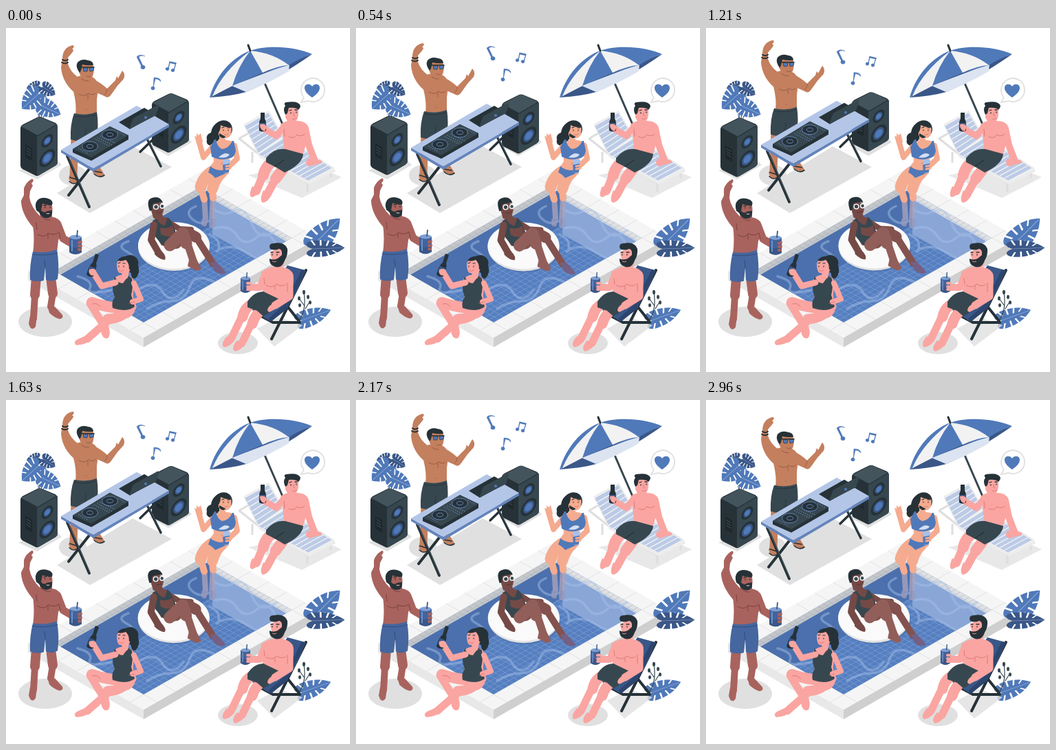
An HTML page that plays this animation: 500x500 px, repeating every 3000 ms.

```html
<!DOCTYPE html>
<html lang="en">
<head>
<meta charset="utf-8">
<title>Pool party</title>
<style>
html,body{margin:0;width:100%;height:100%;overflow:hidden;background:#fff}
svg{display:block;width:100%;height:100%}
.s{fill:var(--s)}
.l{fill:none;stroke:var(--s);stroke-linecap:round;stroke-linejoin:round}
.ln{fill:none;stroke:var(--d);stroke-width:.8;stroke-linecap:round}
.k{fill:#263238}
.g{fill:#37474f}
.b{fill:#5079b9}
.n{fill:#3a5788}
.sh{fill:#e0e0e0}
.ink{fill:none;stroke:#263238;stroke-linecap:round;stroke-linejoin:round}
.w{fill:none;stroke:#fff;stroke-linecap:round}
</style>
</head>
<body>
<svg viewBox="0 0 500 500">
<defs>
  <g id="leaf">
    <path d="M0 0C-.3-.5-1-.4-1 .2C-1 .9-.5 1.3 0 1.6C.5 1.3 1 .9 1 .2C1-.4.3-.5 0 0"/>
    <path class="w" stroke-width=".09" d="M-.45.1L-1-.05M-.4.4L-1 .4M-.35.7L-.9.8M-.3 1L-.6 1.2M.45.1L1-.05M.4.4L1 .4M.35.7L.9.8M.3 1L.6 1.2"/>
    <path class="w" stroke-width=".04" opacity=".5" d="M0 0V1.5"/>
  </g>
  <g id="speaker">
    <path class="k" d="M21 146Q21 142 25 140L45 130Q49 128 53 130L72 138Q75 140 75 143V195Q75 198 72 200L48 214Q45 216 42 214L24 205Q21 203 21 200Z"/>
    <path fill="#43545d" d="M22 143L47 130Q49 129 52 130L73 140L46 156Z"/>
    <path class="g" d="M45 158L72 142Q75 140 75 144V195Q75 198 72 200L48 214Q45 215 45 212Z"/>
    <path fill="#1d272c" d="M28 169L38 175V193L28 188Z"/>
    <path class="ink" style="stroke:#43545d" d="M30 174L36 178M30 178L36 182M30 182L36 186"/>
    <g transform="translate(60 164) skewY(-30)"><circle class="k" r="8.5"/><circle class="n" r="5.5"/><circle class="b" r="3.8"/></g>
    <g transform="translate(60 189) skewY(-30)"><circle class="k" r="11.5"/><circle class="n" r="8"/><circle class="b" r="5.5"/></g>
  </g>
  <g id="can">
    <path fill="#44639b" d="M-9-11Q0-16 9-11V11Q0 17-9 11Z"/>
    <path class="n" d="M-9 2Q0 7 9 2V11Q0 17-9 11Z"/>
    <path fill="#6d90c9" d="M-6-7H-4V10L-6 9Z"/>
    <ellipse fill="#7f9fd2" cy="-11" rx="8.5" ry="3.2"/>
    <path fill="none" stroke="#3a5788" stroke-width="1.8" d="M2-11L3-21"/>
  </g>
  <clipPath id="basin"><path d="M70 353L284 230L416 305L200 428Z"/></clipPath>
</defs>

<!-- ground shadows -->
<path class="sh" d="M74 240L184 172L241 202L122 269Z"/>
<path class="sh" d="M18 207L45 220L81 199L72 190ZM208 170L236 186L270 166L262 158Z"/>
<ellipse class="sh" cx="97" cy="214" rx="20" ry="15"/>
<ellipse class="sh" cx="57" cy="427" rx="39" ry="22"/>
<path class="sh" d="M352 214L430 247L488 217L440 196Z" opacity=".75"/>

<!-- potted leaves -->
<path class="ink" style="stroke:#3a5788" d="M42 88Q49 110 49 135M58 90Q52 110 51 135M40 106Q47 118 48 135M64 117Q56 118 53 135"/>
<g class="n"><use href="#leaf" transform="translate(47 84) rotate(78) scale(8 11)"/><use href="#leaf" transform="translate(54 86) rotate(-58) scale(10 13)"/></g>
<g class="b"><use href="#leaf" transform="translate(47 96) rotate(48) scale(16 20)"/><use href="#leaf" transform="translate(52 113) rotate(-65) scale(13 19)"/></g>

<use id="spkL" href="#speaker"/>
<use id="spkR" href="#speaker"/>

<g id="booth">
  <g style="--s:#c37f5e;--d:#8f5640">
    <path class="l" stroke-width="11" d="M100 160L98 215M125 158L130 203"/>
    <path class="s" d="M94 210L103 212L104 223Q100 229 94 225L91 218ZM126 200L135 200L143 213Q141 218 135 216L126 210Z"/>
    <path class="ink" stroke-width="1.6" d="M93 217L102 220M128 208L139 210M92 223Q98 229 104 224M128 212Q136 219 143 214"/>
    <path class="s" d="M82 45C82 34 87 27 97 25Q101 26 96 31Q100 31 96 36L90 43L90 52Q93 63 105 72L103 96C90 88 81 73 80 57Z"/>
    <path class="s" d="M126 74Q137 79 147 88L159 76L161 70L163 73L169 62Q174 67 171 74L162 84L152 98Q148 103 143 99L127 92Z"/>
    <path class="s" d="M97 74Q106 68 114 70Q127 69 131 76Q135 88 132 104L132 125L101 126Q103 112 98 92Z"/>
    <path class="s" d="M108 62L110 73Q117 79 122 72V64Z"/>
    <path class="s" d="M106 56C107 49 124 48 127 55Q129 65 125 72Q120 78 112 74Q105 68 106 56"/>
    <path class="k" d="M105 62Q101 55 104 50Q110 44 119 47Q127 48 127 54Q118 55 111 53L109 62L107 65Z"/>
    <path class="b" stroke="#263238" stroke-width=".7" d="M112 58L119 58L118 63L113 63ZM121 58L128 57L127 62L122 63Z"/>
    <path class="ink" stroke-width="1.3" d="M106 57L128 57"/>
    <path class="ln" d="M117 70Q120 72 123 70M106 96Q114 101 120 95Q126 99 130 95M119 97V103M110 74Q116 78 120 77M116 118L117 119M147 89Q147 95 143 97"/>
    <path class="ink" stroke-width="2" d="M82 46Q86 49 90 46M81 50Q86 53 90 50"/>
    <path class="g" d="M99 124Q117 128 132 122Q135 140 132 161Q123 165 115 161L113 164Q103 165 94 162Q93 140 99 124"/>
    <path class="ink" stroke-width=".8" d="M115 160L116 145M99 128Q115 131 132 126"/>
  </g>
  <path class="ink" stroke-width="3.4" d="M228 148L195 180M205 161L225 201"/>
  <path class="ink" stroke-width="4" d="M121 205L91 243M89 186L121 260"/>
  <path class="ink" style="stroke:#4e606a" stroke-width="1" d="M90 186L122 259M206 161L226 200"/>
  <path fill="#6484bb" d="M80 177L127 204L237 140V144L127 209L80 181Z"/>
  <path fill="#b4c6e7" d="M80 177L190 113L237 140L127 204Z"/>
  <path class="k" d="M97 176L151 143L178 156V162L124 193L97 181Z"/>
  <path class="g" d="M97 176L151 143L178 156L124 188Z"/>
  <g fill="#263238" stroke="#6f94d2" stroke-width=".8">
    <ellipse cx="122" cy="172" rx="11.500" ry="7"/><ellipse cx="151" cy="155" rx="11.500" ry="7"/>
    <ellipse cx="122" cy="172" rx="4.500" ry="2.700"/><ellipse cx="151" cy="155" rx="4.500" ry="2.700"/>
  </g>
  <path class="ink" style="stroke:#6f94d2" stroke-width="1.2" stroke-dasharray=".1 3.2" d="M129 161L151 172M133 159L154 170M137 157L158 167M106 175L120 183M163 151L172 156"/>
  <path class="k" d="M164 137L201 116L218 126L180 147Z"/>
  <path class="g" d="M179 147L184 133Q185 131 187 130L220 112Q223 111 222 115L218 127Z"/>
  <circle class="b" cx="203" cy="130" r="2"/>
</g>

<g id="notes" fill="#5079b9" stroke="#5079b9">
  <path d="M200 57L193 42Q196 39 202 41Q194 37 190 42L198 58ZM214 87L217 74Q222 74 225 78Q225 72 215 72Z" stroke-width=".5"/>
  <ellipse cx="199" cy="57" rx="3" ry="2.5"/><ellipse cx="213.500" cy="87.500" rx="2.500" ry="2.300"/>
  <ellipse cx="234.500" cy="59.500" rx="2.200" ry="2"/><ellipse cx="242.500" cy="61.500" rx="2.200" ry="2"/>
  <path fill="none" stroke-width="1.3" d="M236 59L238 49L247 51L244 61"/><path stroke-width="2" d="M238 50L247 52"/>
</g>

<!-- pool -->
<path fill="#e8e8e8" d="M32 353L200 450V464L32 367Z"/>
<path fill="#cfcfcf" d="M200 450L454 305V319L200 464Z"/>
<path fill="#f5f5f5" d="M32 353L284 208L454 305L200 450Z"/>
<path id="joints" fill="none" stroke="#dcdcdc" stroke-width=".8"/>
<g clip-path="url(#basin)">
  <path fill="#c6c6c6" d="M70 353L284 230V300L70 400Z"/><path fill="#e0e0e0" d="M284 230L416 305V350L284 300Z"/>
  <path fill="#567fc0" d="M70 364L284 241L416 316L200 440Z"/>
  <path id="grid" fill="none" stroke="#8cabdb" stroke-width=".7" opacity=".7"/>
  <path fill="#4b70ad" d="M70 364L300 232V286L105 398Z"/>
  <path fill="#89a6d6" d="M300 249L430 323L372 340L300 300Z"/>
  <path class="w" style="stroke:#a9c1e8" stroke-width="3.500" opacity=".45" d="M300 262Q316 275 331 266T357 284T388 297T414 300M304 291Q325 285 336 302T365 304T396 322M306 325Q325 311 348 326T370 332M276 259Q259 266 270 277T296 280M104 361Q127 367 122 378T153 381M178 310Q160 316 174 324T190 340T184 357M193 380Q216 365 228 384T258 381M205 408Q222 397 241 397T267 376T303 369M94 372Q115 382 132 396T166 407M296 300Q312 307 309 321"/>
</g>

<!-- parasol, lounger -->
<path class="ink" style="stroke:#37474f" stroke-width="3" d="M365 55L402 140"/>
<path class="n" d="M296 101Q328 99 349 93Q392 75 445 38L376 60Z"/>
<path fill="#dce4f2" d="M328 84L349 93Q376 83 411 63L412 52Z"/>
<path class="b" d="M355 33C327 43 304 71 296 101L329 84L373 65L411 54Q429 43 445 38C422 27 379 24 355 33"/>
<path fill="#f2f2f2" d="M355 33Q314 64 300 99L329 84Q337 56 355 33M355 33L373 65Q394 55 411 54Q388 36 355 33"/>
<path class="ink" stroke-width="3" d="M352 25L355 33"/>
<path fill="none" stroke="#dedede" stroke-width="3" d="M338 160L372 187L438 225L478 207M340 160L354 152M358 180V196M438 225V238M472 210V218"/>
<path fill="#ededed" d="M345 140L382 120L403 156L477 203V209L440 227L368 188Z"/>
<path fill="#bccbe6" d="M347 142L381 123L402 158L367 182ZM367 183L404 160L474 204L440 222Z"/>
<path id="slats" fill="none" stroke="#f4f4f4" stroke-width="1.3"/>

<g style="--s:#faa5a1;--d:#d56f70">
  <path class="l" stroke-width="10" d="M435 146L440 170L448 191"/><path class="s" d="M438 190L452 191Q461 192 459 196L441 201Q433 199 438 190"/>
  <path class="l" stroke-width="16" d="M392 190Q377 200 374 214"/><path class="l" stroke-width="12" d="M374 213L364 237M392 219L380 241"/><path class="l" stroke-width="16" d="M407 199L392 219"/>
  <path class="s" d="M358 230L369 236Q364 245 357 246Q352 243 358 230M374 236L386 242Q381 253 373 254Q368 250 374 236"/>
  <path class="s" d="M399 140Q409 133 420 135Q435 134 439 143Q439 164 431 185L404 181Q404 164 399 140"/>
  <path class="l" stroke-width="9" d="M404 143L393 157L376 147"/>
  <path class="k" d="M370 123H376V132Q379 135 378 149Q373 152 368 149Q367 136 370 132Z"/><path class="n" d="M368 138H378V145H368Z"/>
  <path class="s" d="M369 140Q377 138 379 144L376 150Q369 149 369 140"/>
  <path class="s" d="M407 118Q410 111 424 114Q427 128 422 135V140Q414 143 410 137L406 130Z"/>
  <path class="k" d="M406 126Q402 118 406 113Q403 109 407 108Q425 105 428 113Q428 116 425 119Q421 115 411 116L409 124Z"/>
  <path class="g" d="M378 189Q390 174 406 176L432 183Q431 198 405 210Q394 203 378 195Z"/>
  <path class="ln" d="M416 132Q419 134 422 131M411 158Q418 162 423 155Q430 159 434 154M404 147L405 157M418 123V127L420 128"/>
  <path class="ink" stroke-width="1.3" d="M414 123V124M422 122V123M412 120L415 119M420 119L423 119M404 192L391 201"/>
</g>
<path fill="#fff" stroke="#e0e0e0" stroke-width="1.8" d="M433 101L429 108L440 106A17 17 0 1 0 433 101"/>
<path class="b" d="M445 101C438 96 434 92 434 87C434 81 442 80 445 85C448 80 456 81 456 87C456 92 452 96 445 101"/>

<!-- woman on the edge -->
<g style="--s:#f5ab8f;--d:#c97560">
  <path class="k" d="M305 139C314 130 329 134 329 147Q329 154 323 158L309 162Q306 175 297 171Q290 169 292 162Q290 155 298 152Q299 144 305 139"/>
  <g opacity=".8"><path class="l" style="stroke:#a9a2bd" stroke-width="8" d="M288 246L290 276L288 284M301 243L299 280"/><path fill="#9b9bbd" d="M284 278H294L291 288Q284 291 284 278M295 277H304L305 287Q298 295 295 288Z"/></g>
  <path class="l" stroke-width="16" d="M313 211Q304 219 300 234"/><path class="l" stroke-width="17" d="M301 208Q287 216 283 231"/>
  <path class="l" stroke-width="10" d="M284 235L288 249M300 237L301 247"/>
  <path class="s" d="M297 170Q309 161 317 163Q329 162 334 169Q333 183 324 190Q323 200 324 211Q314 222 293 215Q292 206 302 194Q302 183 297 170"/>
  <path class="l" stroke-width="8" d="M300 173L287 188L281 167M332 171L336 190L323 202"/>
  <path class="s" d="M277 168L274 157L277 158L277 153L280 156L283 153L286 165L284 171Z"/>
  <path class="s" d="M310 153V166Q316 171 319 165V158ZM308 143Q315 136 327 142Q329 152 325 158Q317 164 309 156Z"/>
  <path class="k" d="M304 157Q301 141 310 136Q325 134 328 145Q317 144 312 141Q312 149 308 153Z"/>
  <path class="b" d="M297 173L303 162L305 162Q307 173 314 176Q324 175 329 164L331 164L334 178Q333 189 322 190Q311 193 299 187ZM297 201Q308 210 323 205L322 210Q309 216 304 218Q299 212 294 210Z"/>
  <path class="ink" stroke-width="1.2" d="M316 148V149M323 148V149M314 145L317 144M322 145L325 145"/><path class="ln" d="M317 155Q320 157 323 154M318 182L316 189M314 196V198"/>
  <path fill="#a6c1ea" d="M315 191L326 191L324 210Q319 213 316 209Z"/><path class="b" d="M315 199L325 197L324 209Q319 212 316 209Z"/>
  <path fill="#d3e0f5" d="M309 188Q318 179 325 184Q321 190 309 188"/><path class="l" stroke-width="3" d="M320 201L326 200M320 205L326 204"/>
</g>

<g id="floater" style="--s:#754a46;--d:#4f2e2b">
  <ellipse cx="246" cy="323" rx="51" ry="32" fill="#4268a5" opacity=".5"/>
  <ellipse cx="244" cy="318" rx="52" ry="35" fill="#e2e2e2"/><ellipse cx="244" cy="316" rx="52" ry="34" fill="#fafafa"/>
  <path class="l" stroke-width="8" d="M239 284L252 292L269 293"/>
  <path class="s" d="M213 280Q224 273 236 276Q246 285 247 302Q255 310 248 320L226 316Q215 300 213 280"/>
  <path class="g" d="M214 281L218 276Q223 286 231 287L235 275L239 279Q247 294 248 304L256 312Q249 325 234 321Q222 311 214 299Z"/>
  <path class="s" d="M224 290Q234 293 242 287L246 301Q236 306 225 300Z"/>
  <path class="l" stroke-width="10" d="M215 286L211 308L222 327"/><path class="s" d="M216 322L226 324Q234 332 231 337Q224 337 216 329Z"/>
  <g style="--s:#83524f">
    <path class="l" stroke-width="16" d="M247 313L263 297L276 304"/><path class="l" stroke-width="10" d="M277 305L301 343"/>
    <path fill="#746084" d="M297 341L306 340Q316 350 320 356Q311 360 303 353Z"/>
  </g>
  <g style="--s:#925e5a">
    <path class="l" stroke-width="17" d="M238 316L257 298L262 313"/><path class="l" stroke-width="11" d="M263 311L272 338"/>
    <path class="s" d="M266 337L277 336L284 350Q279 355 273 351L264 346Z"/>
  </g>
  <path class="s" d="M210 260L214 276Q224 281 229 275L226 268V255L215 251Z"/>
  <path class="s" d="M210 257Q217 250 228 256Q231 264 227 271Q219 276 212 269Z"/>
  <path class="k" d="M209 266Q203 250 212 247Q224 243 228 254Q218 253 213 256L212 265Z"/>
  <g fill="#37474f" stroke="#fff" stroke-width="1.4"><circle cx="218" cy="260" r="3.4"/><circle cx="227" cy="259" r="3"/></g>
  <path class="ln" d="M219 268Q223 270 226 267"/>
</g>

<g id="waver" style="--s:#a9635e;--d:#6e3a38">
  <path class="l" stroke-width="14" d="M44 362L42 388M65 362L68 386"/><path class="l" stroke-width="10" d="M42 388L40 422M68 386L65 405"/>
  <path class="s" d="M35 418L45 419L43 434Q39 440 35 435L33 430ZM60 403L71 405L82 417Q84 422 78 423Q70 421 63 414Z"/>
  <path class="s" d="M26 243L26 233Q29 224 38 219Q42 221 37 226L39 229L35 237L34 246Q36 260 50 274L46 296C32 284 22 266 22 251Z"/>
  <path class="l" stroke-width="11" d="M75 285L83 306L100 316"/>
  <path class="s" d="M41 277Q50 271 58 274Q73 273 79 281Q83 294 76 309L74 326L39 328Q42 307 39 286Z"/>
  <path class="s" d="M47 255Q52 249 64 251Q69 258 67 270V276Q58 282 50 276Z"/>
  <path class="k" d="M44 265Q41 255 46 250Q53 244 64 249Q69 252 67 257Q58 257 53 255L51 265Q55 270 60 266L67 265Q68 275 61 276Q53 278 48 268Z"/>
  <path class="ink" stroke-width="1.3" d="M57 260V261M64 260V261M55 258L59 257M62 257L66 257"/><path d="M58 269H64Q61 272 58 269" fill="#d9a6a0"/>
  <path class="ln" d="M46 300Q57 306 61 298Q69 302 76 298M61 300V306M51 274Q58 280 64 279M44 283L45 293M77 297L79 306"/>
  <path fill="#45669f" d="M39 325Q58 328 74 322Q78 345 75 365Q66 370 58 366L57 348L55 367Q44 370 35 366Q34 345 39 325"/>
  <path class="ink" style="stroke:#304a77" stroke-width=".9" d="M38 329Q58 332 75 327M57 348L56 337"/>
  <use href="#can" transform="translate(101 315)"/>
  <path class="l" stroke-width="4" d="M106 312L109 311M106 317L109 317M106 322L108 322"/>
</g>

<!-- woman in front -->
<g style="--s:#faa5a1;--d:#d56f70">
  <path class="k" d="M170 334Q181 327 187 332Q194 336 192 345Q196 356 188 364Q182 365 182 357L177 351Z"/>
  <path class="l" stroke-width="15" d="M182 405Q168 423 148 423"/><path class="l" stroke-width="11" d="M150 424L118 452"/>
  <path class="s" d="M114 448L123 453Q117 460 102 461Q97 457 103 453Z"/>
  <path class="l" stroke-width="16" d="M173 408Q145 406 125 399"/><path class="l" stroke-width="11" d="M122 400L143 434"/>
  <path class="s" d="M137 432L148 430Q153 443 149 450Q143 454 139 445Z"/>
  <path class="s" d="M156 365Q164 357 175 359Q187 362 188 374Q182 387 187 403Q190 416 176 422L155 405Q160 391 156 365"/>
  <path class="g" d="M158 361Q162 371 170 371L178 360L183 364Q185 378 182 388L187 405Q176 414 155 407Q153 398 158 391Q152 378 158 361"/>
  <path class="l" stroke-width="9" d="M159 370L139 375L126 354"/><path class="l" stroke-width="8" d="M186 371L196 394L184 398"/>
  <path class="k" d="M130 328L135 330L131 342Q133 346 127 361Q120 363 117 358Q121 344 126 341Z"/><path class="n" d="M122 346L130 349L127 357L119 355Z"/>
  <path class="s" d="M121 351Q129 348 131 353L128 360Q119 360 121 351"/>
  <path class="s" d="M161 342Q164 333 179 335Q185 346 179 354L177 363Q170 369 168 356Q161 358 161 342"/>
  <path class="k" d="M162 338Q169 329 180 333Q187 340 183 351L179 351Q179 341 174 337Q168 340 162 338"/>
  <path class="ink" stroke-width="1.2" d="M164 346V347M171 346V347M163 342L166 341M170 342L173 342"/><path class="ln" d="M164 352Q167 355 171 352M126 401Q133 399 137 405M179 400L187 398"/>
</g>

<!-- right-hand leaves -->
<g class="b"><use href="#leaf" transform="translate(448 314) rotate(-135) scale(18 33)"/><use href="#leaf" transform="translate(430 425) rotate(-110) scale(13 28)"/></g>
<g class="n"><use href="#leaf" transform="translate(446 321) rotate(-92) scale(12 29)"/></g>
<path class="ink" style="stroke:#37474f" stroke-width="1.2" d="M426 425Q437 410 433 384M434 404L426 393M435 408L442 397"/>
<g class="g"><ellipse cx="433" cy="384" rx="2" ry="3.200"/><ellipse cx="426" cy="393" rx="2" ry="3"/><ellipse cx="439" cy="391" rx="2" ry="3"/><ellipse cx="442" cy="399" rx="2" ry="2.800"/><ellipse cx="427" cy="403" rx="2" ry="2.800"/></g>

<!-- man in the deck chair -->
<ellipse class="sh" cx="337" cy="458" rx="29" ry="16"/>
<path class="sh" d="M365 437L390 463L431 432L396 420Z" opacity=".8"/>
<g style="--s:#faa5a1;--d:#d56f70">
  <path class="ink" stroke-width="4" d="M436 352L386 452M362 414L388 428L427 428M399 392L426 426"/>
  <path class="n" d="M409 345L435 352Q426 382 408 406L383 426L352 406L378 390Z"/>
  <path fill="#2d456e" d="M430 351L436 353L409 408L385 427L381 423L404 402Z"/>
  <path class="l" stroke-width="15" d="M363 399Q347 404 344 420"/><path class="l" stroke-width="11" d="M342 421L327 452"/>
  <path class="l" stroke-width="15" d="M377 406Q362 415 358 430"/><path class="l" stroke-width="11" d="M357 429L343 458"/>
  <path class="s" d="M321 448L332 454Q326 463 317 464Q311 460 321 448M336 454L348 459Q342 468 333 470Q326 466 336 454"/>
  <path class="s" d="M371 355Q382 346 395 347Q412 347 417 357Q421 374 407 400L373 394Q374 377 371 355"/>
  <path class="g" d="M351 398Q359 384 374 383L397 394Q392 410 374 419L365 411L351 406Z"/>
  <path class="l" stroke-width="11" d="M412 360L412 390L391 403"/><path class="s" d="M394 396L398 405L383 413Q377 411 383 404Z"/>
  <path class="l" stroke-width="10" d="M376 359L369 377L354 377"/>
  <use href="#can" transform="translate(348 373) scale(.78 .85)"/><path class="l" stroke-width="4" d="M351 371H355M351 376H355M351 380H354"/>
  <path class="s" d="M384 328Q389 319 402 322Q408 334 403 346Q394 353 389 346Z"/>
  <path class="k" d="M384 321Q381 313 389 313Q405 310 409 321Q410 330 405 338Q401 350 391 347Q382 344 383 335Q388 338 395 335L401 330Q402 322 397 321Q390 324 384 321"/>
  <path class="ink" stroke-width="1.3" d="M387 329V330M394 329V330M385 326L388 326M393 326L397 326"/><path d="M387 339Q390 341 393 339" fill="none" stroke="#e49190"/>
  <path class="ln" d="M378 374Q388 379 393 372Q401 377 406 373M391 375V380M409 371L409 383M375 364L376 372"/>
</g>
</svg>
<script>
const el = id => document.getElementById(id);
const lerp = (a, b, k) => a.map((v, i) => v + (b[i] - v) * k);
const seg = (a, b) => `M${a}L${b}`;

// Evenly spaced rungs between rails a-b and c-d
function rungs(a, b, c, d, n) {
  let s = '';
  for (let i = 0; i <= n; i++) s += seg(lerp(a, b, i / n), lerp(c, d, i / n));
  return s;
}
const draw = (id, d) => el(id).setAttribute('d', d);

const inner = [[70, 353], [284, 230], [416, 305], [200, 428]];
const rim = [[-19, -11], [19, -11], [19, 11], [-19, 11]];
draw('joints', inner.map((a, i) => {
  const b = inner[(i + 1) % 4];
  const out = p => p.map((v, k) => v + rim[i][k]);
  return rungs(a, b, out(a), out(b), i % 2 ? 5 : 8);
}).join(''));

const [A, B, C, D] = inner;
draw('grid', rungs(A, B, D, C, 30) + rungs(A, D, B, C, 20));
draw('slats', rungs([347, 142], [367, 182], [381, 123], [402, 158], 6) +
  rungs([367, 183], [440, 222], [404, 160], [474, 204], 11));

const tri = x => 1 - Math.abs(1 - 2 * (x % 1));
const move = (id, x, y) => el(id).setAttribute('transform', `translate(${x} ${y})`);

function tick() {
  const p = Math.floor(performance.now() % 3000 * .024) / 72;
  const sway = Math.sin(p * 4 * Math.PI);
  move('booth', 0, -9 * tri(p));
  move('notes', 0, -19 * tri(p * 2));
  move('spkL', 0, -1.6 * sway);
  move('spkR', 191, -34 + 1.8 * sway);
  move('waver', 0, -.9 * sway);
  move('floater', -.6 * sway, .5 * sway);
  requestAnimationFrame(tick);
}
tick();
</script>
</body>
</html>
```
